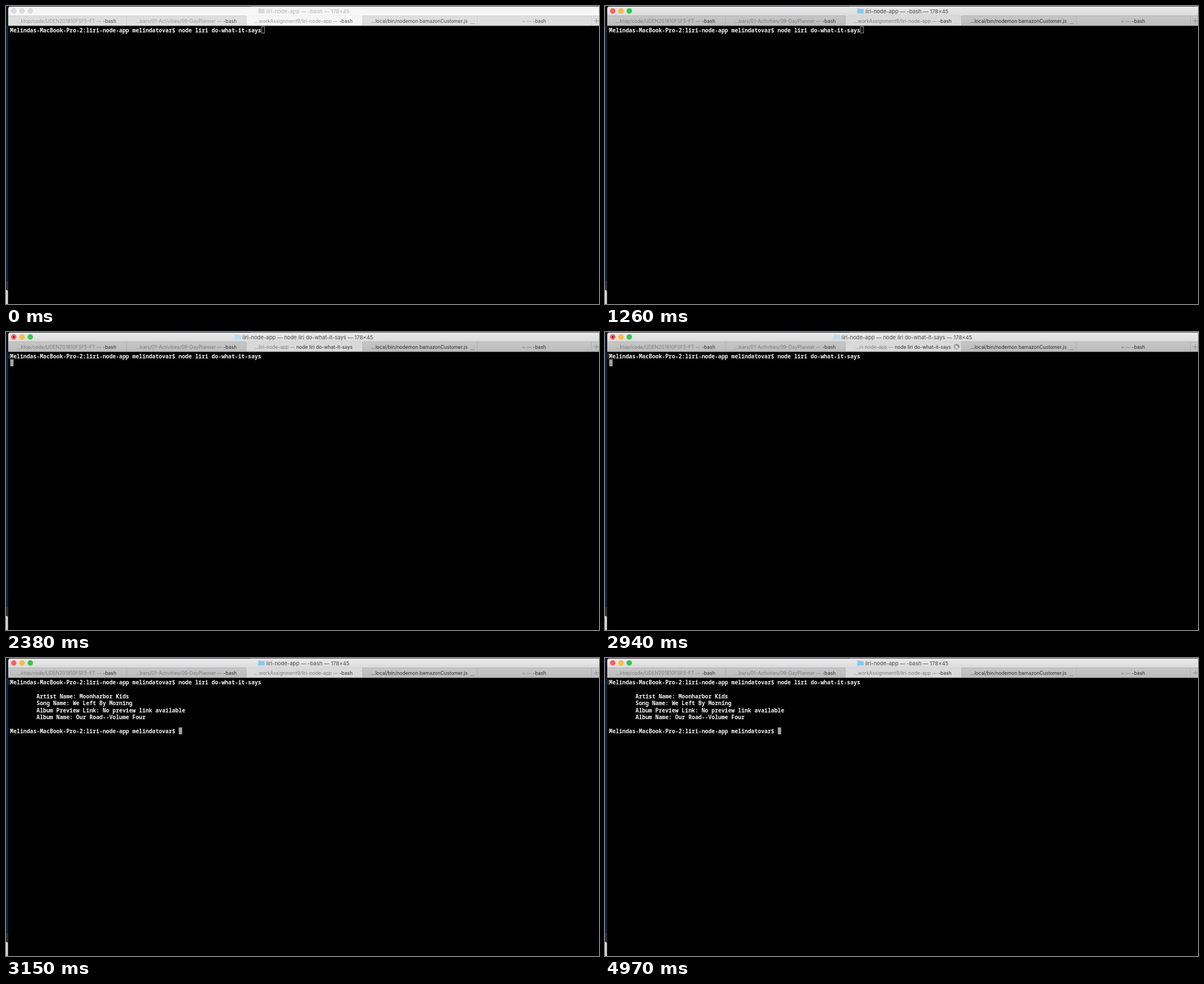
Write an HTML page that moves like this. It is 1055 by 531 pixels and loops after 5040 ms.

```html
<!DOCTYPE html>
<html lang="en">
<head>
<meta charset="utf-8">
<title>Terminal session</title>
<style>
  html, body { margin: 0; width: 100%; height: 100%; overflow: hidden; background: #000; }
  svg { display: block; width: 1055px; height: 531px; }
  text { white-space: pre; font-family: Inter, Roboto, sans-serif; }
  #title { font-size: 9.5px; fill: #4a4a4a; }
  .tab { font-size: 8.6px; fill: #2c2c2c; }
  .path { fill: #7c7c7c; }
  .mono { font: 600 9.8px "Noto Sans Mono", "DejaVu Sans Mono", monospace; fill: #f4f4f4; }
  #bar { fill: url(#active); }
  #tabs { fill: url(#shade); }
  #current { fill: #d9d9d9; }
  #lines { stroke: #acacac; }
  .idle #bar, .idle #current { fill: #f6f6f6; }
  .idle #tabs { fill: #dedede; }
  .idle #lines { stroke: #cbcbcb; }
  .idle #title { fill: #b4b4b4; }
  .idle .path { fill: #999; }
  .idle .tab { fill: #484848; }
  .idle .light { fill: #dcdcdc; stroke: #d0d0d0; }
  .idle #folder { fill: #d9d9d9; }
  .busy #folder { fill: #b9dcf3; }
</style>
</head>
<body>
<svg id="stage" viewBox="0 0 1055 531">
  <defs>
    <linearGradient id="active" x2="0" y2="1">
      <stop stop-color="#ececec"/><stop offset="1" stop-color="#d9d9d9"/>
    </linearGradient>
    <linearGradient id="shade" x2="0" y2="1">
      <stop stop-color="#c6c6c6"/><stop offset="1" stop-color="#bcbcbc"/>
    </linearGradient>
  </defs>

  <!-- desktop edge behind the window -->
  <rect width="1055" height="531" fill="#10151f"/>
  <rect x="435" width="620" height="1" fill="#44474d"/>
  <rect y="36" width="4" height="454" fill="#0b2342"/>
  <rect y="490" width="4" height="16" fill="#2a303a"/>
  <path d="M0 506H2L3.5 508V531H0Z" fill="#d9d9d9"/>

  <rect x="4" y="35" width="1051" height="496"/>
  <path id="bar" d="M4 18V5Q4 1 8 1H1055V18Z"/>
  <rect id="tabs" x="4" y="17.5" width="1051" height="17.5"/>
  <rect id="current" x="427" y="17.5" width="207" height="17.5"/>
  <path id="lines" fill="none" stroke-width=".8"
    d="M4 17.5H427M634 17.5H1055M214.5 18V35M427.5 18V35M634.5 18V35M838.5 18V35M1041.5 18V35M4 35H1055"/>

  <g stroke-width=".4">
    <circle class="light" cx="13.8" cy="8.8" r="4.6" fill="#fc605b" stroke="#e0443e"/>
    <circle class="light" cx="28.5" cy="8.8" r="4.6" fill="#fdbc40" stroke="#dea034"/>
    <circle class="light" cx="43.2" cy="8.8" r="4.6" fill="#34c84a" stroke="#27aa35"/>
  </g>
  <circle id="dot" cx="13.8" cy="8.8" r="1.6" fill="#6b0d0a"/>

  <path id="folder" d="M0 5.2Q0 4.5 .7 4.5H4L5 5.6H10.8Q11.5 5.6 11.5 6.3V12.6Q11.5 13.3 10.8 13.3H.7Q0 13.3 0 12.6Z" fill="#82caf4"/>
  <text id="title" x="537" y="12.6" text-anchor="middle"></text>

  <g id="labels" text-anchor="middle"></g>
  <text class="tab" x="826" y="31.5">…</text>
  <path d="M1046 26.5H1055M1050.3 22.2V30.8" stroke="#8a8a8a" stroke-width=".9"/>
  <g id="spinner" stroke="#333" stroke-width="1" stroke-linecap="round"></g>

  <path id="mark" d="M7 39.5H5.5V47H7" fill="none" stroke="#777" stroke-width=".8"/>
  <g id="screen"></g>
  <rect id="cursor"/>
</svg>

<script>
const LOOP = 5040, CELL = 5.88, ROW = 12.5, LEFT = 7.3, TOP = 36.2;
const ACTIVATE = 1260, SOLID = 1330, ENTER = 2100, RUN = 2380, SPIN = 2730, DONE = 3150;
const COMMAND = "node liri do-what-it-says";
const PROMPT = "Melindas-MacBook-Pro-2:liri-node-app melindatovar$ ";
const OUTPUT = [
  "Artist Name: Moonharbor Kids",
  "Song Name: We Left By Morning",
  "Album Preview Link: No preview link available",
  "Album Name: Our Road--Volume Four"
];

const $ = id => document.getElementById(id);

function setAll(el, attrs) {
  for (const key in attrs) el.setAttribute(key, attrs[key]);
}

function add(parent, tag, attrs, text = "") {
  const el = document.createElementNS("http://www.w3.org/2000/svg", tag);
  setAll(el, attrs);
  el.textContent = text;
  parent.append(el);
  return el;
}

function addTab(x, path, job) {
  const label = add($("labels"), "text", { class: "tab", x, y: 29.8 });
  const parts = [add(label, "tspan", { class: "path" }), add(label, "tspan", {})];
  const set = (a, b) => {
    parts[0].textContent = a;
    parts[1].textContent = b;
  };
  set(path, job);
  return { label, set };
}

addTab(107.5, "…ktop/code/UDEN201810FSF5-FT — ", "-bash");
addTab(320.5, "…bars/01-Activities/09-DayPlanner — ", "-bash");
const current = addTab(529.5, "", "");
addTab(735.5, "", "…local/bin/nodemon bamazonCustomer.js");
addTab(939.5, "~ — ", "-bash");

const addRow = (row, text, column = 0) => add($("screen"), "text", {
  class: "mono", x: LEFT + column * CELL, y: TOP + 10.3 + row * ROW
}, text);

addRow(0, PROMPT + COMMAND);
const results = OUTPUT.map((line, i) => addRow(i + 2, line, 8));
results.push(addRow(7, PROMPT));

const spokes = Array.from({ length: 12 }, (_, i) => add($("spinner"), "path", {
  d: "M0 -2.9V-5", transform: `translate(625.5 26.4) rotate(${i * 30})`
}));

const show = (el, on) => el.setAttribute("visibility", on ? "visible" : "hidden");

function drawCursor(t) {
  const hollow = t < SOLID;
  const [column, row] = t < ENTER ? [76, 0] : t < DONE ? [0, 1] : [51, 7];
  const inset = hollow ? 0.5 : 0;
  setAll($("cursor"), {
    x: LEFT + 0.2 + column * CELL + inset, y: TOP + row * ROW + inset,
    width: 6 - 2 * inset, height: 12.4 - 2 * inset,
    fill: hollow ? "none" : "#a3a3a3", stroke: hollow ? "#a3a3a3" : "none"
  });
  const blink = (t >= 1820 && t < ENTER) || (t >= 4410 && t < 4970);
  show($("cursor"), !blink);
}

function draw(t) {
  const busy = t >= RUN && t < DONE;
  const spinning = t >= SPIN && t < DONE;
  const job = busy ? COMMAND : "-bash";

  $("stage").setAttribute("class", t < ACTIVATE ? "idle" : busy ? "busy" : "");
  $("title").textContent = `liri-node-app — ${job} — 178×45`;
  $("folder").setAttribute("transform", `translate(${busy ? 407 : 448.7} 0)`);
  show($("dot"), busy);

  const path = spinning ? "…ri-node-app" : busy ? "…liri-node-app" : "…workAssignment9/liri-node-app";
  current.set(path + " — ", job);
  current.label.setAttribute("x", spinning ? 530.5 : 529.5);

  show($("spinner"), spinning);
  const step = Math.floor((t - SPIN) / 70);
  spokes.forEach((spoke, i) => {
    const age = (((step - i) % 12) + 12) % 12;
    spoke.setAttribute("opacity", 0.95 - age * 0.06);
  });

  show($("mark"), t >= ENTER);
  results.forEach(line => show(line, t >= DONE));
  drawCursor(t);
}

function tick() {
  draw(performance.now() % LOOP);
  requestAnimationFrame(tick);
}
tick();
</script>
</body>
</html>
```
